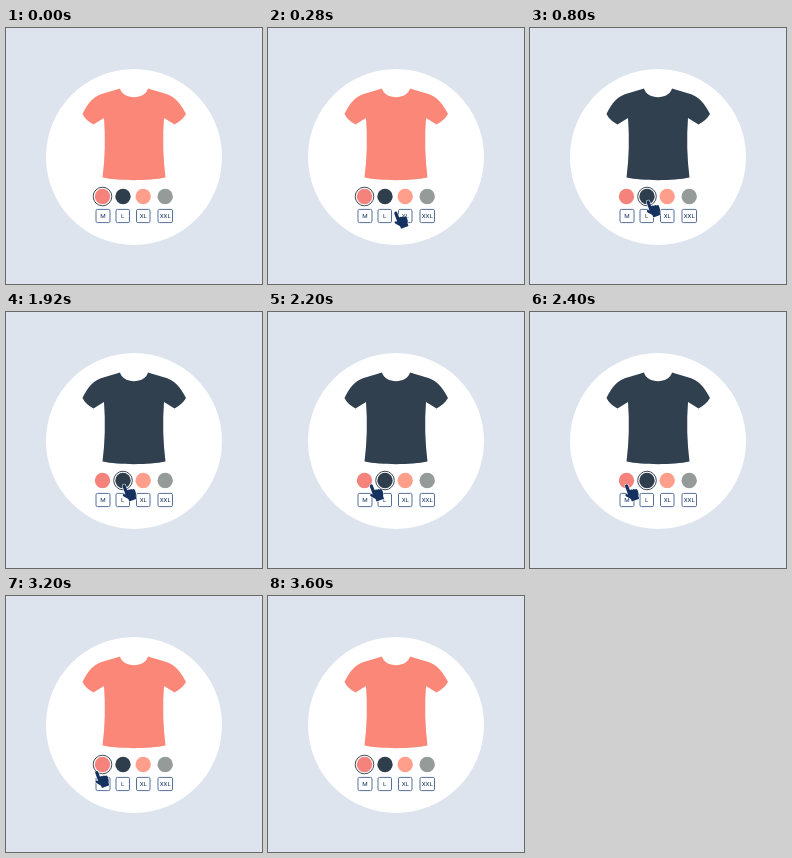
These frames come from a looping animation (256 px wide and 256 px high, 3.88 s). An HTML page with a canvas:

```html
<!DOCTYPE html>
<html lang="en">
<head>
<meta charset="utf-8">
<title>Shirt colour picker</title>
<style>
  html, body { margin: 0; width: 100%; height: 100%; overflow: hidden; background: #dde4ee; }
  canvas { display: block; width: 100vw; height: 100vh; }
</style>
</head>
<body>
<canvas id="stage" width="256" height="256"></canvas>
<script>
const ctx = document.getElementById('stage').getContext('2d');
const LOOP = 3880, STEP = 40;
const NAVY = '#14315f', CORAL = [251, 135, 120], SLATE = [48, 64, 79];

const swatches = [
  { x: 96.5, color: '#f5837b' },
  { x: 117, color: '#2f3e4d' },
  { x: 137.2, color: '#ff9f8b' },
  { x: 159.2, color: '#959b98' }
];
const sizes = [
  { x: 90, w: 14, label: 'M' },
  { x: 110, w: 13.5, label: 'L' },
  { x: 130.5, w: 13.5, label: 'XL' },
  { x: 152, w: 14.5, label: 'XXL' }
];

const shirt = new Path2D(
  'M114 60.5 C117 72 139 72 142 60.5 L157 65 C169 68 174 75 180 86 ' +
  'C177 91 173 94 168.5 96.5 L158 90 C156.5 110 157 130 159.5 149.5 ' +
  'C144 153 112 153 96.5 149.5 C99 130 99.5 110 98 90 L87.5 96.5 ' +
  'C83 94 79 91 76.5 86 C82 75 87 68 99 65 Z');

// Pointing hand, fingertip at the origin
const hand = new Path2D(
  'M-1.6 1.6 Q-1.6 0 0 0 Q1.6 0 1.6 1.6 L1.6 6.8 Q3.2 5.8 4.2 7.2 ' +
  'Q5.6 6.4 6.6 7.8 Q8.6 7.4 8.8 9.4 L8.6 12.4 Q8.4 14 7.4 15.2 ' +
  'L7.4 18 L-0.6 18 L-0.6 15.4 L-4.2 11 Q-5 9.6 -3.8 9 Q-2.8 8.6 -1.6 10 Z');

const clamp = v => Math.max(0, Math.min(1, v));
const span = (t, from, to) => clamp((t - from) / (to - from));
const mix = (a, b, p) => a + (b - a) * p;
const ease = p => p < 0.5 ? 4 * p ** 3 : 1 - (2 - 2 * p) ** 3 / 2;

function disc(x, y, r, color) {
  ctx.fillStyle = color;
  ctx.beginPath();
  ctx.arc(x, y, r, 0, Math.PI * 2);
  ctx.fill();
}

function ring(x, alpha) {
  if (alpha <= 0) return;
  ctx.globalAlpha = alpha;
  ctx.strokeStyle = '#3e4a58';
  ctx.lineWidth = 1;
  ctx.beginPath();
  ctx.arc(x, 168.5, 9.3, 0, Math.PI * 2);
  ctx.stroke();
  ctx.globalAlpha = 1;
}

function drawSizes() {
  ctx.font = '6.2px Roboto, "Open Sans", sans-serif';
  ctx.textAlign = 'center';
  ctx.textBaseline = 'alphabetic';
  for (const { x, w, label } of sizes) {
    ctx.strokeStyle = '#55709a';
    ctx.lineWidth = 1;
    ctx.beginPath();
    ctx.roundRect(x, 181.4, w, 13.2, 1.4);
    ctx.stroke();
    ctx.fillStyle = NAVY;
    ctx.fillText(label, x + w / 2, 190.2);
  }
}

function drawHand(t) {
  const enter = ease(span(t, 0, 560));
  const across = ease(span(t, 1880, 2440));
  const leave = ease(span(t, 3000, 3560));
  const alpha = span(t, 0, 240) * (1 - span(t, 3280, 3560));
  if (alpha <= 0) return;
  const x = mix(137, 117.5, enter) - 21.5 * across - 32 * leave;
  const y = mix(195, 172.5, enter) + 14 * leave;
  const press = Math.sin(Math.PI * span(t, 560, 800)) + Math.sin(Math.PI * span(t, 2440, 2600));
  const scale = 1 - 0.08 * press;
  ctx.save();
  ctx.globalAlpha = alpha;
  ctx.translate(x, y);
  ctx.rotate(-0.36);
  ctx.scale(scale, scale);
  ctx.lineJoin = 'round';
  ctx.lineWidth = 1;
  ctx.strokeStyle = '#fff';
  ctx.stroke(hand);
  ctx.fillStyle = NAVY;
  ctx.fill(hand);
  ctx.restore();
}

function draw(t) {
  const dark = span(t, 560, 800) - span(t, 2440, 2600);
  ctx.fillStyle = '#dde4ee';
  ctx.fillRect(0, 0, 256, 256);
  disc(128, 129, 88, '#fff');
  const rgb = CORAL.map((c, i) => Math.round(mix(c, SLATE[i], dark)));
  ctx.fillStyle = `rgb(${rgb})`;
  ctx.fill(shirt);
  for (const { x, color } of swatches) disc(x, 168.5, 7.7, color);
  ring(swatches[0].x, 1 - dark);
  ring(swatches[1].x, dark);
  drawSizes();
  drawHand(t);
}

const start = performance.now();
function tick() {
  const t = (performance.now() - start) % LOOP;
  draw(Math.floor(t / STEP) * STEP);
  requestAnimationFrame(tick);
}
tick();
</script>
</body>
</html>
```
